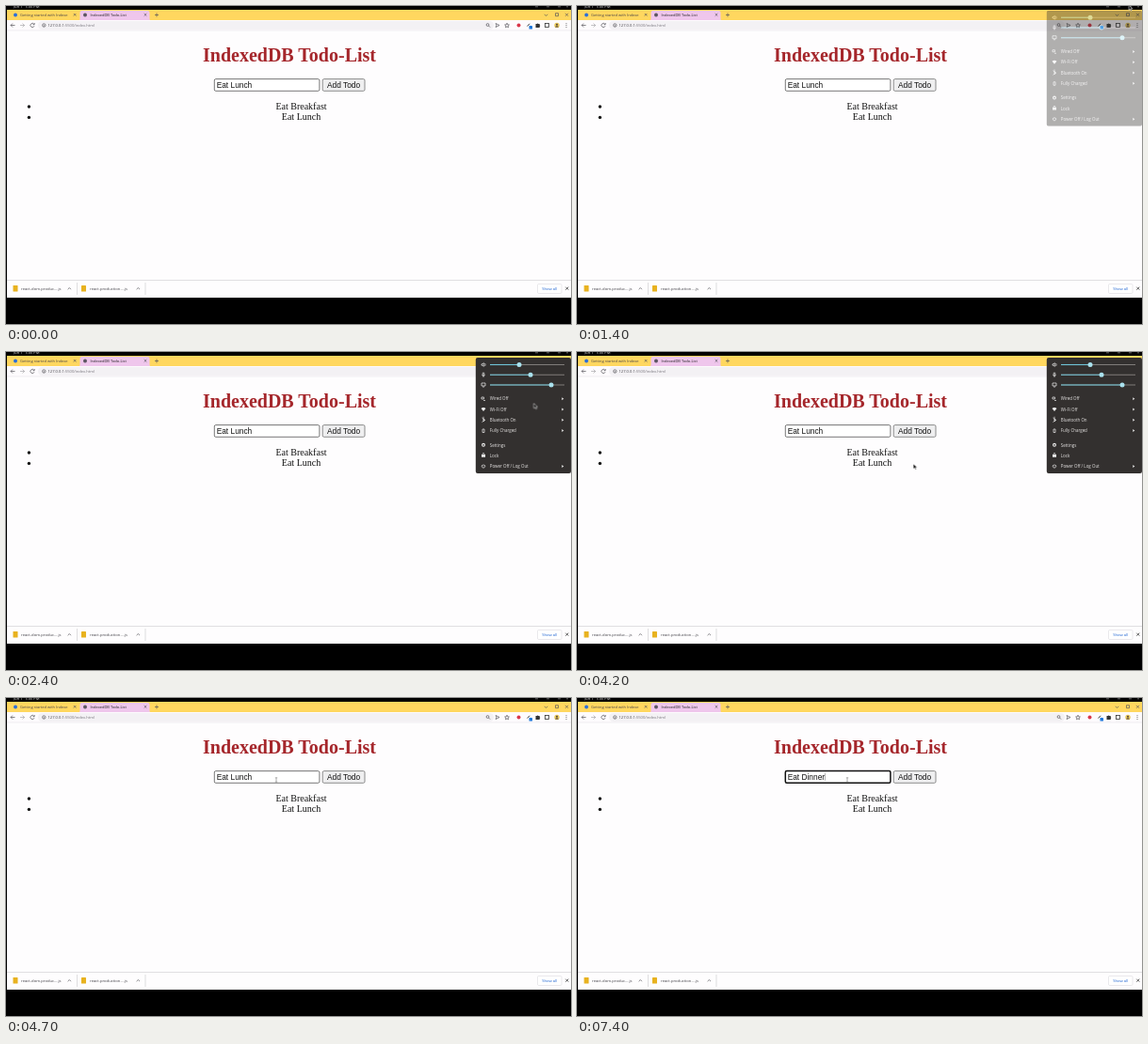
An HTML page that plays this animation: 600x338 px, repeating every 8 s.

```html
<!DOCTYPE html>
<html lang="en">
<head>
<meta charset="utf-8">
<title>IndexedDB Todo-List</title>
<style>
  html, body { margin: 0; width: 100%; height: 100%; overflow: hidden; background: #000; }
  svg { display: block; width: 100%; height: 100%; }
  text { white-space: pre; }
  .ui { font: 4.2px "Open Sans", "Noto Sans", sans-serif; fill: #45434a; }
  .serif { font: 10px "Liberation Serif", "Times New Roman", serif; fill: #111; text-anchor: middle; }
  .title { font-size: 20px; font-weight: bold; fill: #a5262b; }
  .form { font: 8.333px "Liberation Sans", Arial, sans-serif; fill: #111; }
  .line { fill: none; stroke: #55535a; stroke-width: .7; }
  .pale { fill: none; stroke: #eee; stroke-width: .7; }
  .menu-text { font: 4.45px "Open Sans", "Noto Sans", sans-serif; fill: #e9e7e6; }

  #menu, #pointer, #arrow, #beam { animation: 8s linear infinite; }
  #menu { animation-name: menu; }
  #pointer { animation-name: move; }
  #arrow { animation-name: arrow; }
  #beam { animation-name: beam; }

  @keyframes menu {
    0%, 15.6% { opacity: 0; transform: translateY(-2px); }
    20.6% { opacity: 1; transform: none; }
    55.3% { opacity: 1; transform: none; }
    58.5%, 100% { opacity: 0; transform: translateY(-2px); }
  }
  @keyframes move {
    0%, 3.75% { transform: translate(420px, 190px); animation-timing-function: ease-in-out; }
    13.75%, 18.75% { transform: translate(586px, -1px); animation-timing-function: ease-in-out; }
    26.25% { transform: translate(566px, 27px); animation-timing-function: ease-out; }
    30% { transform: translate(560.5px, 54.5px); }
    32.5%, 35% { transform: translate(560px, 57.5px); }
    37.5% { transform: translate(559px, 63px); }
    40%, 45% { transform: translate(557px, 60px); animation-timing-function: ease-in-out; }
    52.5% { transform: translate(357.5px, 119px); animation-timing-function: ease-out; }
    58%, 100% { transform: translate(287px, 87px); }
  }
  @keyframes arrow {
    0%, 3.74% { opacity: 0; }
    3.75%, 57.49% { opacity: 1; }
    57.5%, 100% { opacity: 0; }
  }
  @keyframes beam {
    0%, 57.49% { opacity: 0; }
    57.5%, 100% { opacity: 1; }
  }
</style>
</head>
<body>
<svg viewBox="0 0 600 338" preserveAspectRatio="none">
  <rect width="600" height="338" fill="#000"/>
  <text class="ui" x="8" y="1.6" style="fill:#ddd">Jun 1  1:45 PM</text>
  <path class="pale" d="M562 .8h3M574 .8h3M586 .8h3M595 .8h2" opacity=".6"/>

  <!-- tab strip -->
  <rect x="1" y="4" width="599" height="12" fill="#ffd75f"/>
  <path d="M77 15.5q1.5 0 1.5-2V7q0-2 2-2h70q2 0 2 2v6.500q0 2 1.500 2z" fill="#efc6ec"/>
  <circle cx="10" cy="9.500" r="2" fill="#2c6fd8"/>
  <text class="ui" x="15" y="11" style="font-size:4px">Getting started with Indexe</text>
  <circle cx="84" cy="9.500" r="2" fill="#5d5662"/>
  <text class="ui" x="89.500" y="11" style="font-size:4px;fill:#222">IndexedDB Todo-List</text>
  <path class="line" d="M71.800 8l2.600 2.600m0-2.600l-2.600 2.600M146.700 8l2.600 2.600m0-2.600l-2.600 2.600M158 9.500h4m-2-2v4"/>
  <path class="line" d="M571.800 8.800l1.700 1.700 1.700-1.700M583.500 7.700h3v3h-3zM594 7.800l3 3m0-3l-3 3"/>

  <!-- toolbar -->
  <rect x="1" y="15" width="599" height="11" fill="#fdfbfd"/>
  <rect x="34" y="16" width="484" height="9" rx="4.500" fill="#f3f1f4"/>
  <path class="line" d="M9.500 20.500h-4.500m2-2l-2 2 2 2M29.800 19.400a2.100 2.100 0 1 0 .2 1.800M30.200 18v1.700h-1.700"/>
  <path class="line" d="M15 20.500h4.500m-2-2l2 2-2 2" opacity=".5"/>
  <circle class="line" cx="40.300" cy="20.500" r="1.700"/>
  <path class="line" d="M40.300 20.200v1.300"/>
  <text class="ui" x="44.500" y="22" style="font-size:4.100px">127.0.0.1:<tspan fill="#77747c">5500/index.html</tspan></text>
  <circle class="line" cx="511.500" cy="20" r="1.400"/>
  <path class="line" d="M512.500 21l1.600 1.600M520 18.500l4 2-4 2 .8-2zM532 18.200l.7 1.600 1.700.2-1.300 1.100.4 1.700-1.500-.9-1.500.9.4-1.700-1.300-1.100 1.700-.2z"/>
  <circle cx="544.500" cy="20.500" r="2" fill="#d9384b"/>
  <path d="M553.500 21.500l2.500-2.700" stroke="#444" stroke-width="1"/>
  <rect x="555.500" y="21" width="3.500" height="3.500" rx=".6" fill="#1f78dc"/>
  <path d="M562.500 19h1.300a.9.900 0 0 1 1.600 0h1.300v1.300a.8.800 0 0 1 0 1.500v1.200h-4.200z" fill="#333"/>
  <rect x="572.500" y="18.500" width="4" height="4" fill="none" stroke="#333" stroke-width=".8"/>
  <circle cx="585" cy="20.500" r="2.700" fill="#e7c95c"/>
  <circle cx="585" cy="19.700" r="1" fill="#54423a"/>
  <path d="M583 22.600q2-2.800 4 0z" fill="#54423a"/>
  <path d="M595 18.200v.9m0 1v.9m0 1v.9" stroke="#555" stroke-width=".9"/>

  <!-- page -->
  <rect x="1" y="26" width="599" height="284" fill="#fefdfe"/>
  <path d="M1 26h599" stroke="#e5e3e6" stroke-width=".6"/>
  <text class="serif title" x="301" y="58.600">IndexedDB Todo-List</text>
  <rect id="field" x="221.300" y="77.600" width="111.600" height="12.700" rx="1.500" fill="#fff" stroke="#555" stroke-width=".8"/>
  <text id="entry" class="form" x="223.700" y="86.700">Eat Lunch</text>
  <path id="caret" d="M0 79.800v8" stroke="#777" stroke-width=".6"/>
  <rect x="336.200" y="77.600" width="44.800" height="12.700" rx="1.500" fill="#efeff0" stroke="#707070" stroke-width=".8"/>
  <text class="form" x="358.600" y="86.700" text-anchor="middle">Add Todo</text>
  <circle cx="24.400" cy="107" r="1.700" fill="#111"/>
  <circle cx="24.400" cy="118.400" r="1.700" fill="#111"/>
  <text class="serif" x="313.500" y="109.800">Eat Breakfast</text>
  <text class="serif" x="313.500" y="121.400">Eat Lunch</text>

  <!-- downloads -->
  <path d="M1 291.500h599" stroke="#d5d3d6" stroke-width=".7"/>
  <path d="M75.500 294v13M148 294v13" stroke="#d0ced2" stroke-width=".7"/>
  <rect x="7.500" y="297" width="5" height="6.500" rx=".6" fill="#e8b21f"/>
  <rect x="80" y="297" width="5" height="6.500" rx=".6" fill="#e8b21f"/>
  <text class="ui" x="16" y="302">react-dom.produc....js</text>
  <text class="ui" x="89" y="302">react.production....js</text>
  <path class="line" d="M65.600 301.200l1.700-1.700 1.700 1.700M138.600 301.200l1.700-1.700 1.700 1.700"/>
  <rect x="564.500" y="295.500" width="25.500" height="10" rx="1.200" fill="#fff" stroke="#dcdbe0" stroke-width=".6"/>
  <text class="ui" x="577.200" y="302" text-anchor="middle" style="fill:#2467d2">Show all</text>
  <path class="line" style="stroke:#222" d="M594.300 298.700l3 3m0-3l-3 3"/>

  <g id="menu">
    <rect x="498.800" y="6" width="101.200" height="123" rx="2" fill="#33302f"/>
    <path class="pale" d="M505 12.800h1l1.300-1.200v3.800l-1.300-1.200h-1zM508.600 12q1 1.500 0 3M506.200 22.200h1.600v2.500h-1.600zM505.300 24.500q1.700 2.500 3.400 0M507 25.800v1M505 33h4v3h-4zM506 37h2"/>
    <path class="pale" d="M505 48h2.500v2H505zM507 51.500h2M507 71l1.500 1.200-3 2.300m0-4.500l3 2.500-1.500 1.200v-5M506 82h2v3.500h-2zM506 108.800v-.7q1-1.400 2 0v.7M508 120a1.700 1.700 0 1 1-2 0M507 119.300v2"/>
    <path d="M504.500 60q2.500-2.200 5 0l-2.500 3zM505 109h4v2.800h-4z" fill="#eee"/>
    <circle cx="507" cy="98.800" r="1.400" class="pale" style="stroke-width:1.100"/>
  </g>

  <g id="pointer">
    <path id="arrow" d="M0 0v5.300l1.300-1.100.9 1.900 1-.5-.9-1.800h1.700z" fill="#111" stroke="#fff" stroke-width=".5"/>
    <path id="beam" d="M-1.200-2.200h2.400M0-2.200v4.400M-1.200 2.200h2.400" fill="none" stroke="#777" stroke-width=".6"/>
  </g>
</svg>
<script>
  const $ = id => document.getElementById(id);
  const menu = $('menu'), field = $('field'), entry = $('entry'), caret = $('caret');

  function add(tag, attrs, text = '') {
    const node = document.createElementNS('http://www.w3.org/2000/svg', tag);
    for (const key in attrs) node.setAttribute(key, attrs[key]);
    node.textContent = text;
    menu.append(node);
  }

  [[13.5, 545], [24.2, 557], [35, 579]].forEach(([y, knob]) => {
    add('path', { d: `M514 ${y}H593`, stroke: '#807c7a', 'stroke-width': 1.1 });
    add('path', { d: `M514 ${y}H${knob}`, stroke: '#6fc3d6', 'stroke-width': 1.1 });
    add('circle', { cx: knob, cy: y, r: 2.5, fill: '#a9e2ee' });
  });

  [['Wired Off', 49.8, 1], ['Wi-Fi Off', 61, 1], ['Bluetooth On', 72.3, 1], ['Fully Charged', 83.6, 1],
   ['Settings', 99, 0], ['Lock', 110.2, 0], ['Power Off / Log Out', 121.5, 1]].forEach(([label, y, sub]) => {
    add('text', { class: 'menu-text', x: 513.8, y: y + 1.6 }, label);
    if (sub) add('path', { d: `M590.3 ${y - 1.5}l2 1.500-2 1.500z`, fill: '#eee' });
  });

  const FOCUS = 4900;
  const typing = [
    [0, 'Eat Lunch'], [5500, 'Eat Lunc'], [5700, 'Eat Lun'], [5900, 'Eat Lu'], [6000, 'Eat L'],
    [6200, 'Eat '], [6500, 'Eat D'], [6800, 'Eat Di'], [6900, 'Eat Din'], [7100, 'Eat Dinn'],
    [7300, 'Eat Dinne'], [7400, 'Eat Dinner']
  ];
  let start, shown;

  function draw(now) {
    start ??= now;
    const t = (now - start) % 8000;
    const focused = t >= FOCUS;
    const value = typing.findLast(step => step[0] <= t)[1];
    if (value !== shown) {
      entry.textContent = shown = value;
      caret.setAttribute('transform', `translate(${224 + entry.getComputedTextLength()})`);
    }
    caret.setAttribute('visibility', focused ? 'visible' : 'hidden');
    field.setAttribute('stroke', focused ? '#101010' : '#555');
    field.setAttribute('stroke-width', focused ? 1.5 : .8);
    requestAnimationFrame(draw);
  }
  requestAnimationFrame(draw);
</script>
</body>
</html>
```
